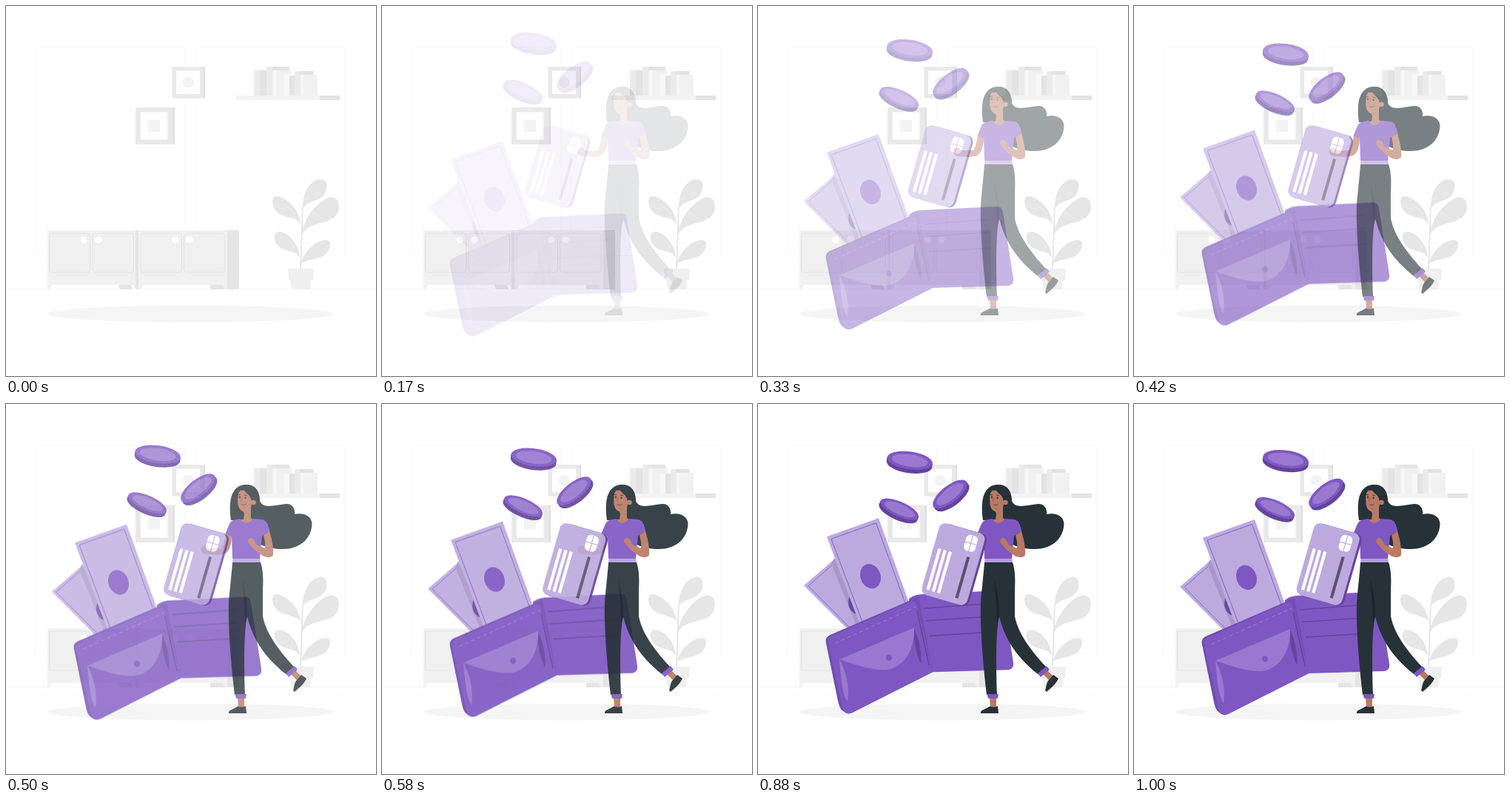
An HTML page for the animation above (1040 ms loop, 500 by 500 pixels).

```html
<!DOCTYPE html>
<html lang="en">
<head>
<meta charset="utf-8">
<title>Wallet</title>
<style>
  html, body { margin: 0; width: 100%; height: 100%; overflow: hidden; background: #fff; }
  svg { display: block; width: 100%; height: 100%; }
</style>
</head>
<body>
<svg viewBox="0 0 500 500">
  <g id="room">
    <g fill="none" stroke="#ebebeb" stroke-width=".3">
      <rect x="39" y="55.500" width="203.500" height="282" rx="2"/>
      <rect x="255" y="55.500" width="203.500" height="282" rx="2"/>
      <path d="M0 382.400H500M48 394H97M407 394H456"/>
    </g>

    <g id="pictures">
      <path fill="#e0e0e0" d="M228 82H269V124.500H228zM180 137H228V187H180z"/>
      <path fill="#e9e9e9" d="M224.500 82H267V124.500H224.500zM175 137H225.500V187H175z"/>
      <path fill="#fff" d="M230 87.500H262V119H230zM182 143.500H218.500V180.500H182z"/>
      <circle cx="246" cy="103" r="7.500" fill="#f3f3f3"/>
      <rect x="192" y="154" width="16" height="16" fill="#f3f3f3"/>
    </g>

    <g id="shelf">
      <path fill="#f3f3f3" d="M310 121H424V127H310z"/>
      <path fill="#e3e3e3" d="M424 121H451V127H424zM343 86.500H352V121H343zM360 82H383V88H360zM383 94H390V121H383zM397 88H416V94H397z"/>
      <path fill="#ebebeb" d="M335 86.500H343V121H335zM352 82H360V121H352zM390 88H397V121H390z"/>
      <path fill="#f1f1f1" d="M360 87H386V93H376V121H360zM397 93H421V121H397z"/>
      <path fill="#f7f7f7" d="M362 87H365V121H362zM376 93H383V121H376zM399 93H402V121H399z"/>
    </g>

    <g id="cabinet">
      <path fill="#f1f1f1" d="M56 303H299V383H294L292 377H185L183 383H175L172 377H62L60 383H56z"/>
      <path fill="#e5e5e5" d="M299 303H315V383H299zM175 303H179V383H175zM152 377H169L171 383H154zM276 377H293L295 383H276z"/>
      <g id="doors" fill="#f0f0f0" stroke="#e3e3e3"></g>
    </g>

    <g id="plant" fill="#e6e6e6">
      <path d="M401 273C401 252 410 236 424 234C434 233 436 244 431 253C425 264 410 262 401 273z"/>
      <path d="M399 311C402 285 424 260 440 258.500C452 259 452 275 446 283C434 298 410 288 399 311z"/>
      <path d="M399 295C395 270 375 257 365 257C357 258 360 270 365 277C375 288 393 284 399 295z"/>
      <path d="M397 340C396 320 380 305 369 305C360 306 362 315 366 322C375 334 390 328 397 340z"/>
      <path d="M398 349C403 330 420 316 433 316C441 318 439 328 432 335C422 344 405 342 398 349z"/>
      <path d="M398 356C399 330 400 300 401 270" fill="none" stroke="#e6e6e6" stroke-width="1.800"/>
      <path fill="#efefef" d="M381 355H416L415 370H412L411 383H386L384 370H382z"/>
    </g>
    <ellipse cx="249.500" cy="416" rx="193.500" ry="11.300" fill="#f5f5f5"/>
  </g>

  <g id="wallet">
    <path fill="#bcaade" d="M62 247L105 210L145 304L121 306z"/>
    <path fill="none" stroke="#7e57c2" stroke-width=".8" d="M105 215L68 247.500L126 306"/>
    <path fill="#a897c8" d="M103 210L99 217L134 304H142z"/>
    <path fill="#69499f" d="M123.500 262C120 272 123 282 133 286z"/>
    <path fill="#bcaade" d="M93 181L163 156L204 270L140 306z"/>
    <path fill="none" stroke="#7e57c2" stroke-width=".9" d="M144 304L99 184L159.500 162.500L199 271"/>
    <ellipse cx="152" cy="234.500" rx="13.500" ry="17" transform="rotate(-20 152 234.500)" fill="#7e57c2"/>

    <path fill="#7e57c2" d="M204 265C209 261 213 260 219 259L322 254C328 254 330 256 331 262L345 351C346 357 343 360.500 338 361L236 364L206 340z"/>
    <path fill="#724eb1" d="M97 314L206 267C211 264 214 262 217 262L236 364L129 418C122 422 118 420 112 414C110 411 109 407 108 403L92 325C91 319 92 317 97 314z"/>
    <path fill="#7e57c2" d="M101 315L208 268C212 267 214 270 215 275L236 364L129 418C122 422 116 419 114 411L95 325C94.500 320 96 318 101 315z"/>
    <path fill="none" stroke="#9d80d2" stroke-dasharray="5 4" d="M104 325L213 276"/>
    <g fill="none" stroke="#65459c" stroke-width="1.600" stroke-linecap="round">
      <path d="M215 281L231 354M225 278L310 271.500M228 294.500L312 289M232 315L316 310"/>
    </g>
    <path fill="#65459c" d="M211 305C217 318 222 338 220 353C214 340 210 325 211 305z"/>
    <path fill="#9879cf" d="M110 347L211 304C212 335 196 360 171 361C150 361 128 353 110 347zM110 347C119 362 124 385 121 404C114 395 112 370 110 347z"/>
    <circle cx="177" cy="344.500" r="4.200" fill="#7e57c2"/>
  </g>

  <g id="woman">
    <path fill="#263238" d="M304 157C301 135 302 109 325 109C337 109 342 119 343 131C348 143 364 136 379 135C388 135 391 143 390 149C403 146 414 152 413.500 163C412 184 395 196 375 196C362 196 354 194 344 190L336 160z"/>
    <g fill="#b97964">
      <path d="M297 174L305 177C305 188 303 196 298 201C291 205 281 204 272 203C266 203 262 199 264 194C268 190 272 191 274 195L291 195C295 188 296 182 297 174z"/>
      <path d="M315 117C312 128 312.500 141 318 144C320 145 322 146 322 149L321 156L316 156C320 164 331 164 334 156L331 154V140L336 116z"/>
    </g>
    <path fill="#263238" d="M312 124C314 119 317 115 321 115C323 121 331 122 332 132L343 135C344 118 337 109 325 109C312 109 307 118 307 126z"/>
    <circle cx="334.500" cy="133" r="3.200" fill="#b97964"/>
    <g fill="#263238">
      <ellipse cx="316" cy="126" rx=".9" ry="1.400"/>
      <ellipse cx="323.500" cy="127" rx=".9" ry="1.400"/>
    </g>
    <path fill="none" stroke="#263238" stroke-width=".8" d="M314 123L317 122M322 123L326 124"/>
    <path fill="none" stroke="#8f5348" stroke-width=".7" d="M319 126L317 131L319 132"/>
    <path fill="none" stroke="#263238" stroke-width=".8" d="M318.500 136C320.500 137 323 136.500 324.500 135"/>

    <path fill="#7e57c2" d="M317 155C308 156 304 158 302 162L296.500 175L305 179L306 209H343L346 178L356.500 172C354 162 352 157 346 156L333 155C330 163 320 163 317 155z"/>
    <path fill="#b97964" d="M348 177L356 172C359 182 362 195 361 204C359 208 352 208 347 205C340 201 332 193 328 188C326 184 328 181 331 181C335 182 337 185 338 190L350 195C351 188 349 182 348 177z"/>
    <path fill="#b39ddb" d="M306.500 209H343L344 214H306z"/>
    <path fill="#263238" d="M306 214H344C347 222 348 235 347 250L347 287C352 313 374 339 391 357L381 367C354 347 334 321 326 287C321.500 305 321.500 350 323 393H309C304 350 300 300 301 268C303 245 305 228 306 214z"/>
    <path fill="#1c262b" d="M320 236L326 270V288L323 297C323 275 320 255 320 236z"/>
    <path fill="#b97964" d="M313 397H322V411H314zM385 365L391 360L399 368L394 374z"/>
    <path fill="#7e57c2" d="M309.500 392H325L324 398H311zM390 354L394 359L382 369L378 364z"/>
    <path fill="#263238" d="M301 418C300 413 306 414 313 408.500C317 410 321 410 324 408L325 418zM399 366L406 371C403 378 396 384 390 389L388 387C390 380 390 375 394 372z"/>
  </g>

  <g id="card">
    <g transform="translate(262.200 216.400) rotate(16)">
      <rect x="-29" y="-50.500" width="64" height="101" rx="9" fill="#65459c"/>
      <rect x="-32" y="-50.500" width="64" height="101" rx="9" fill="#bcaade"/>
      <path fill="#fff" d="M-25.500-15h4.200v58h-4.200zM-18-15h4.200v58h-4.200zM-10.500-15h4.200v58h-4.200z"/>
      <path fill="#5c506f" d="M15-15h4v58h-4z"/>
      <rect x="7" y="-44.500" width="16" height="22" rx="5.500" fill="#fff"/>
      <path fill="none" stroke="#bcaade" stroke-width="1.200" d="M7-33.500H23M15-44.500V-22.500"/>
    </g>
  </g>

  <g id="coins"></g>
</svg>
<script>
  const el = id => document.getElementById(id);

  // Cabinet doors: left edge and knob centre
  el('doors').innerHTML = [[58.500, 105], [117, 125], [182, 229], [240.500, 248]].map(([x, knob]) =>
    `<rect x="${x}" y="307" width="55.500" height="53" rx="4"/>
     <circle cx="${knob}" cy="316" r="4.700" fill="#fff" stroke="none"/>`).join('');

  function coin(x, y, rx, ry, angle) {
    const arc = `A${rx} ${ry} 0 0 0`;
    return `<g transform="translate(${x} ${y}) rotate(${angle})">
      <path fill="#65459c" d="M${-rx} 0V5${arc} ${rx} 5V0z"/>
      <path fill="none" stroke="#583b8c" stroke-width="3" stroke-dasharray="1.300 4" d="M${1 - rx} 3.500${arc} ${rx - 1} 3.500"/>
      <ellipse rx="${rx}" ry="${ry}" fill="#7e57c2"/>
      <ellipse rx="${rx * .79}" ry="${ry * .7}" fill="#9879cf"/>
    </g>`;
  }
  el('coins').innerHTML =
    coin(205.200, 74.700, 31, 12, 8) +
    coin(191.300, 140.500, 28, 10, 24) +
    coin(259.300, 120.200, 28, 11.500, -38);

  const LOOP = 1040, STEP = 1000 / 24, TRAVEL = 30;
  const bezier = (s, a, b) => 3 * (1 - s) ** 2 * s * a + 3 * (1 - s) * s * s * b + s ** 3;

  // Cubic ease with a small overshoot, solved by bisection
  function ease(x) {
    if (x >= 1) return 1;
    let lo = 0, hi = 1;
    for (let i = 0; i < 30; i++) {
      const mid = (lo + hi) / 2;
      if (bezier(mid, .36, .5) < x) lo = mid; else hi = mid;
    }
    return bezier(lo, -.01, 1.38);
  }

  const movers = { wallet: [0, 1], woman: [0, 0], card: [-1, 0], coins: [0, -1] };

  function draw(now) {
    const step = Math.floor((now % LOOP + 4) / STEP);
    const p = step < 3 ? 0 : ease((step * STEP + 20) / 1000);
    const d = TRAVEL * (1 - p);
    for (const [id, [dx, dy]] of Object.entries(movers)) {
      el(id).setAttribute('transform', `translate(${dx * d} ${dy * d})`);
      el(id).setAttribute('opacity', Math.max(0, Math.min(1, p)));
    }
  }

  const start = performance.now();
  function tick() {
    draw(performance.now() - start);
    requestAnimationFrame(tick);
  }
  tick();
</script>
</body>
</html>
```
